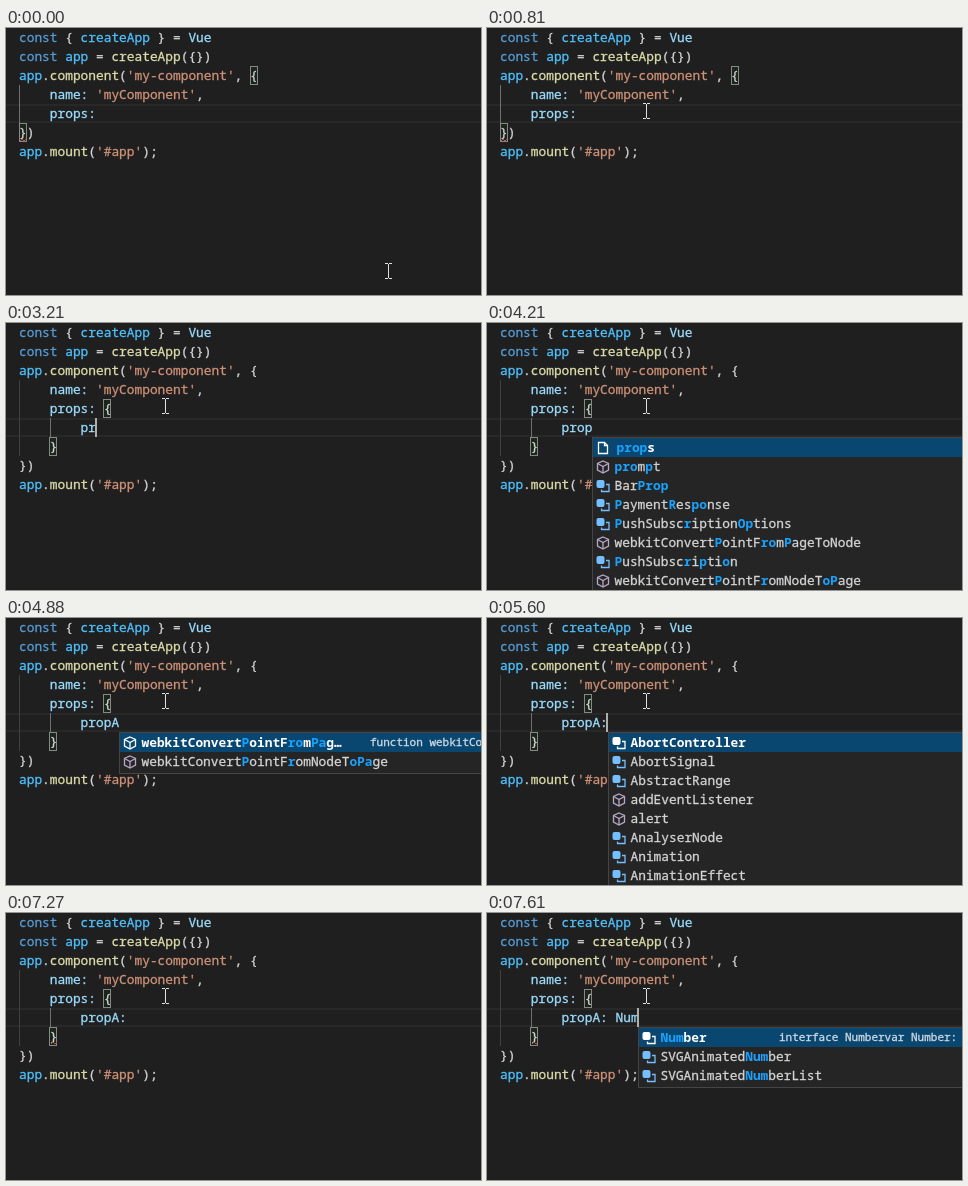
Recreate the animation shown at these times as an HTML page with a canvas. Size 475 by 267 pixels, loop 8000 ms.

```html
<!DOCTYPE html>
<html lang="en">
<head>
<meta charset="utf-8">
<title>Typing component props</title>
<style>
  html, body { margin: 0; width: 100%; height: 100%; overflow: hidden; background: #1e1f1e; }
  canvas { display: block; width: 100vw; height: 100vh; }
</style>
</head>
<body>
<canvas id="stage" width="475" height="267"></canvas>
<script>
const ctx = document.getElementById('stage').getContext('2d');
const W = 475, H = 267, LOOP = 8000;
const LEFT = 13, CHAR = 7.7, ROW = 19, BASE = 14;
const FAMILY = '"Noto Sans Mono", "DejaVu Sans Mono", monospace';
const CODE_FONT = `12.83px ${FAMILY}`;
const BOLD_FONT = `bold ${CODE_FONT}`;
const DETAIL_FONT = `11px ${FAMILY}`;

const color = {
  k: '#569cd6', c: '#4fc1ff', v: '#9cdcfe', f: '#dcdcaa', s: '#ce9178', p: '#d4d4d4'
};

// Each run is a colour key, a bar and its text.
const head = [
  ['k|const', 'p| { ', 'c|createApp', 'p| } = ', 'v|Vue'],
  ['k|const', 'p| ', 'c|app', 'p| = ', 'f|createApp', 'p|({})'],
  ['c|app', 'p|.', 'f|component', 'p|(', "s|'my-component'", 'p|, {'],
  ['v|    name:', 'p| ', "s|'myComponent'", 'p|,']
];
const tail = [
  ['p|})'],
  ['c|app', 'p|.', 'f|mount', 'p|(', "s|'#app'", 'p|);']
];

// Square brackets mark the matched letters.
const menus = {
  prop: {
    x: 105,
    rows: [
      ['file', '[prop]s'],
      ['cube', '[pro]m[p]t'],
      ['type', 'Bar[Prop]'],
      ['type', '[P]ayment[R]es[po]nse'],
      ['type', '[P]ushSubsc[r]iption[Op]tions'],
      ['cube', 'webkitConvert[P]ointF[ro]m[P]ageToNode'],
      ['type', '[P]ushSubsc[r]i[p]ti[o]n'],
      ['cube', 'webkitConvert[P]ointF[r]omNodeT[oP]age']
    ]
  },
  propA: {
    x: 113,
    detail: ['function webkitConvert', 364],
    rows: [
      ['cube', 'webkitConvert[P]ointF[ro]m[Pa]g…'],
      ['cube', 'webkitConvert[P]ointF[r]omNodeT[oPa]ge']
    ]
  },
  value: {
    x: 121,
    rows: [
      ['type', 'AbortController'],
      ['type', 'AbortSignal'],
      ['type', 'AbstractRange'],
      ['cube', 'addEventListener'],
      ['cube', 'alert'],
      ['type', 'AnalyserNode'],
      ['type', 'Animation'],
      ['type', 'AnimationEffect']
    ]
  },
  num: {
    x: 151,
    detail: ['interface Numbervar Number: N', 292],
    rows: [
      ['type', '[Num]ber'],
      ['type', 'SVGAnimated[Num]ber'],
      ['type', 'SVGAnimated[Num]berList']
    ]
  }
};

// Editing steps; typed is null until the object is opened.
const edits = [
  { at: 0, typed: null },
  { at: 1480, typed: '', fresh: true },
  { at: 2150, typed: '' },
  { at: 3210, typed: 'pr' },
  { at: 3560, typed: 'prop', menu: 'prop' },
  { at: 4540, typed: 'propA', menu: 'propA' },
  { at: 5600, typed: 'propA:', menu: 'value' },
  { at: 5930, typed: 'propA: ' },
  { at: 6260, typed: 'propA: ', error: true },
  { at: 7610, typed: 'propA: Num', menu: 'num', error: true }
];
const pointer = [
  { at: 0, x: 382, y: 243 },
  { at: 70, x: 149, y: 100 },
  { at: 130, x: 165, y: 78 },
  { at: 470, x: 159, y: 83 }
];
const caretSpans = [
  [470, 810], [1480, 2150], [2510, 2870], [3210, 4210],
  [4540, 4880], [5600, 6260], [6930, 7270], [7610, 8000]
];

const latest = (list, t) => list.filter(e => e.at <= t).pop();
const colX = col => LEFT + col * CHAR;

function rect(x, y, w, h, fill) {
  ctx.fillStyle = fill;
  ctx.fillRect(x, y, w, h);
}

// Places letters on a fixed grid and returns the next x.
function mono(text, x, y, fill, font = CODE_FONT, step = CHAR) {
  ctx.font = font;
  ctx.fillStyle = ctx.strokeStyle = fill;
  ctx.lineWidth = 0.3;
  for (const ch of text) {
    ctx.fillText(ch, x, y);
    // A hairline outline thickens the regular weight a little.
    if (font !== BOLD_FONT) ctx.strokeText(ch, x, y);
    x += step;
  }
  return x;
}

function codeLine(runs, row) {
  let x = LEFT;
  for (const run of runs) x = mono(run.slice(2), x, row * ROW + BASE, color[run[0]]);
}

function bracketBox(col, row) {
  const x = Math.floor(colX(col)), y = row * ROW;
  rect(x, y, 8, ROW, 'rgba(0,100,0,0.1)');
  ctx.strokeStyle = '#888';
  ctx.lineWidth = 1;
  ctx.strokeRect(x + 0.5, y + 0.5, 7, ROW - 1);
}

function squiggle(x, y) {
  ctx.strokeStyle = '#c0504a';
  ctx.lineWidth = 1;
  ctx.beginPath();
  ctx.moveTo(x, y);
  for (let i = 1; i < 4; i++) ctx.lineTo(x + i * 2, y - (i % 2) * 2);
  ctx.stroke();
}

function guide(col, from, to, active) {
  rect(Math.round(colX(col)), from * ROW, 1, (to - from) * ROW, active ? '#707070' : '#404040');
}

function ibeam({ x, y }) {
  const c = '#e0e0e0';
  rect(x, y - 7, 1, 14, c);
  for (const edge of [y - 8, y + 7]) {
    rect(x - 3, edge, 3, 1, c);
    rect(x + 1, edge, 3, 1, c);
  }
}

function path(points, close) {
  ctx.beginPath();
  points.forEach(([x, y]) => ctx.lineTo(x, y));
  if (close) ctx.closePath();
  ctx.stroke();
}

const icons = {
  file() {
    path([[-4.5, -5.5], [1.5, -5.5], [4.5, -2.5], [4.5, 5.5], [-4.5, 5.5]], true);
    path([[1.5, -5.5], [1.5, -2.5], [4.5, -2.5]]);
  },
  cube() {
    path([[0, -6], [5.5, -3.5], [5.5, 3], [0, 6], [-5.5, 3], [-5.5, -3.5]], true);
    path([[-5.5, -3.5], [0, -0.5], [5.5, -3.5]]);
    path([[0, -0.5], [0, 6]]);
  },
  type() {
    ctx.beginPath();
    ctx.roundRect(-6.5, -6, 8, 8, 2);
    ctx.fill();
    path([[3, -1.5], [6, -1.5], [6, 5.5], [-1.5, 5.5], [-1.5, 3.5]]);
  }
};
const iconColor = { file: '#c5c5c5', cube: '#b8a6c6', type: '#75beff' };

function icon(kind, x, y, selected) {
  ctx.save();
  ctx.translate(x, y);
  ctx.fillStyle = ctx.strokeStyle = selected ? '#fff' : iconColor[kind];
  ctx.lineWidth = 1.3;
  icons[kind]();
  ctx.restore();
}

function drawMenu({ x, rows, detail }) {
  const top = 6 * ROW, h = rows.length * ROW + 4;
  rect(x, top, W - x, h, '#454545');
  rect(x + 1, top + 1, W - x, h - 2, '#252526');
  rect(x + 1, top + 1, W - x, ROW, '#094771');

  rows.forEach(([kind, label], i) => {
    const y = top + 1 + i * ROW, selected = i === 0;
    icon(kind, x + 11, y + 10, selected);
    let tx = x + (kind === 'file' ? 24.5 : 22.5);
    label.split(/[\[\]]/).forEach((part, n) => {
      const hit = n % 2 === 1;
      const plain = selected ? '#fff' : '#d4d4d4';
      const font = hit || selected ? BOLD_FONT : CODE_FONT;
      tx = mono(part, tx, y + BASE, hit ? '#18a3ff' : plain, font);
    });
  });
  if (detail) mono(detail[0], detail[1], top + BASE, '#d0dae2', DETAIL_FONT, 6.6);
}

function draw(t) {
  const { typed, menu, fresh, error } = latest(edits, t);
  const open = typed !== null;
  const row = open ? 5 : 4;
  const endRow = open ? 7 : 5;

  rect(0, 0, W, H, '#1e1f1e');
  for (const y of [row * ROW, row * ROW + 17]) rect(0, y, W, 2, '#282828');

  if (open) {
    guide(0, 3, fresh ? 5 : 7, !typed);
    if (!fresh) guide(4, 5, 6, !!typed);
    bracketBox(11, 4);
    bracketBox(4, 6);
    if (fresh) bracketBox(0, 7);
  } else {
    guide(0, 3, 5, true);
    bracketBox(30, 2);
    bracketBox(0, 5);
    squiggle(14, 113);
  }

  head.forEach(codeLine);
  codeLine(['v|    props:', open ? 'p| {' : 'p| '], 4);
  if (open) {
    codeLine(['v|        ' + typed], 5);
    codeLine(['p|    }'], 6);
  }
  tail.forEach((runs, i) => codeLine(runs, endRow + i));
  if (error) squiggle(45, 131);

  if (menu) drawMenu(menus[menu]);
  if (caretSpans.some(([on, off]) => t >= on && t < off)) {
    const col = open ? 8 + typed.length : 11;
    rect(Math.floor(colX(col) - 1), row * ROW, 2, ROW, '#aeafad');
  }
  ibeam(latest(pointer, t));
}

const start = performance.now();
function tick() {
  draw((performance.now() - start) % LOOP);
  requestAnimationFrame(tick);
}
tick();
</script>
</body>
</html>
```
